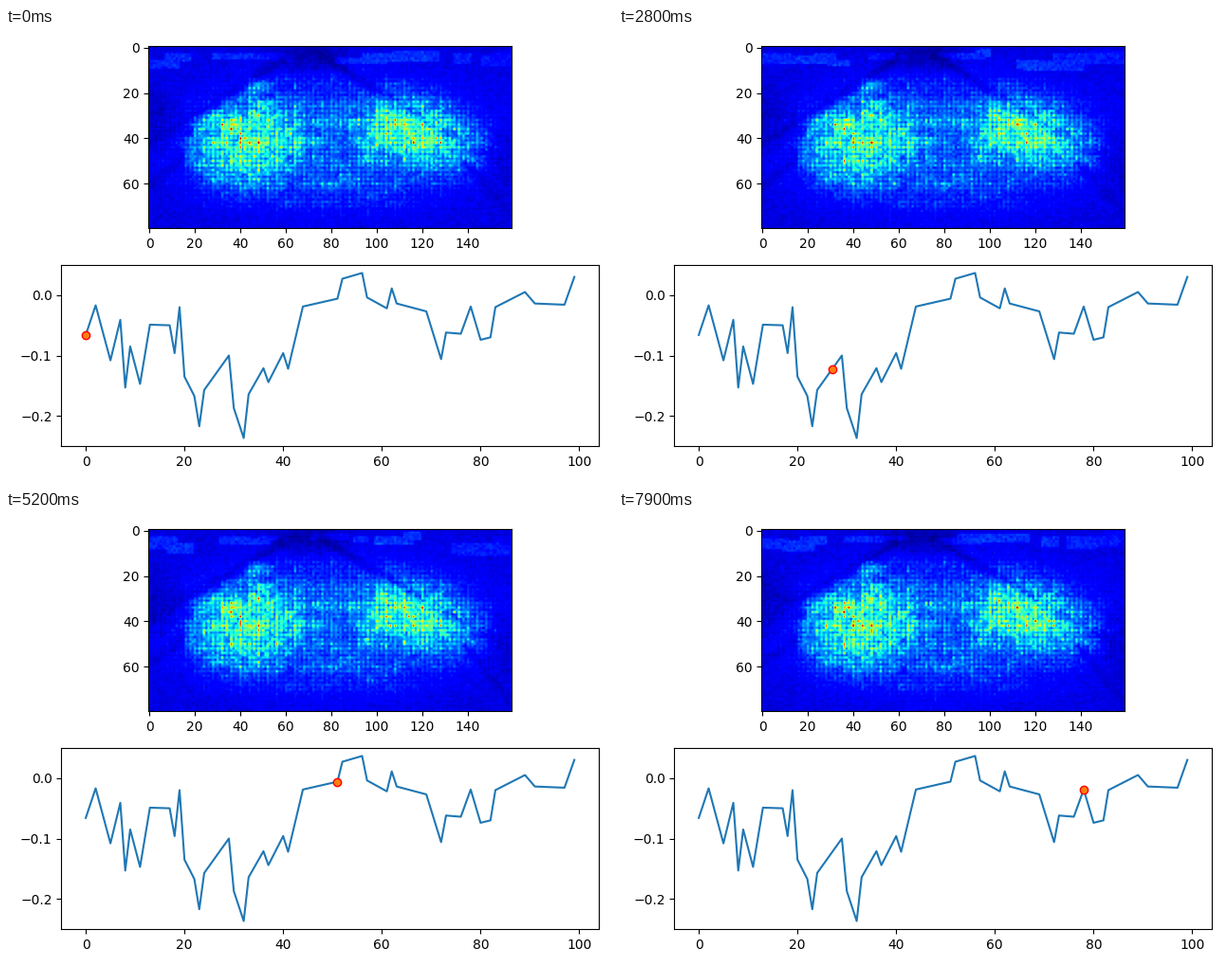
Animation of 640x480 px, one loop 8000 ms. Source, as a matplotlib script:

```python
import numpy as np
import matplotlib.pyplot as plt
from matplotlib.animation import FuncAnimation

COLS, ROWS = 160, 80
FRAMES, STEP_MS = 80, 100
VANISH_X, VANISH_Y = 68, 2

# Turning points of the curve: step, height in thousandths
TURNS = [
    (0, -66), (2, -17), (5, -108), (7, -41), (8, -153), (9, -85),
    (11, -147), (13, -49), (17, -50), (18, -96), (19, -20), (20, -135),
    (22, -167), (23, -217), (24, -157), (29, -100), (30, -187),
    (32, -236.5), (33, -164), (36, -121), (37, -144), (40, -96),
    (41, -122), (44, -19), (51, -6), (52, 27), (56, 36.5), (57, -4),
    (61, -22), (62, 11), (63, -14), (69, -27), (72, -106), (73, -62),
    (76, -64), (78, -19), (80, -74), (82, -70), (83, -20), (89, 5),
    (91, -14), (97, -16), (99, 30)]
steps, heights = np.array(TURNS).T
trace = np.interp(np.arange(100), steps, heights / 1000)

rng = np.random.default_rng(7)
x, y = np.meshgrid(np.arange(COLS), np.arange(ROWS))


def blob(cx, cy, sx, sy, power=3):
    r = np.hypot((x - cx) / sx, (y - cy) / sy)
    return np.exp(-r ** power)


def sigmoid(v):
    return 1 / (1 + np.exp(-v))


def ray(x0, y0, x1, y1, reach):
    """Soft line from one point towards another, fading with distance."""
    size = np.hypot(x1 - x0, y1 - y0)
    dx, dy = (x1 - x0) / size, (y1 - y0) / size
    off = (x - x0) * dy - (y - y0) * dx
    along = (x - x0) * dx + (y - y0) * dy
    return np.exp(-(off / 2) ** 2 - np.abs(along) / reach) * (along > 0)


# Fixed lattice texture
lattice = (1 + 0.2 * np.cos(np.pi * x)) * (1 + 0.15 * np.cos(np.pi * y))
lattice *= 1 + 0.1 * np.cos(np.pi * x / 2)
lattice *= 1 + 0.1 * np.cos(2 * np.pi * (y - 33) / 9)
coarse = np.kron(rng.normal(0, 0.15, (ROWS // 4, COLS // 4)), np.ones((4, 4)))
lattice *= np.exp(rng.normal(0, 0.22, (ROWS, COLS)) + coarse)

# Two centres of attention in a wide, faint glow
left_blob = blob(40, 41, 25, 20) * sigmoid((x - 17) / 1.2)
left_blob *= sigmoid((y - 33 + 0.55 * (x - 15)) / 2)
left_blob += 0.6 * blob(47, 17, 6, 3)
right_blob = blob(113, 35, 19, 15) + 0.6 * blob(132, 42, 18, 13)
right_blob *= sigmoid((150 - x) / 1.2)
right_blob *= 0.7 + 0.3 * sigmoid((y - 20 - 0.42 * (x - 97)) / 2.5)
glow = blob(80, 42, 66, 28)

ground = 0.085 - 0.04 * blob(0, 33, 17, 14) - 0.05 * blob(70, 4, 17, 6)
ground -= 0.03 * blob(160, 50, 14, 14)

# Roadside shapes: side, phase and size are drawn once
COUNT, LIFE = 16, 20
sides = np.where(np.arange(COUNT) % 5 < 2, -1, 1)
phases = rng.permutation(COUNT) * LIFE / COUNT
lengths = rng.uniform(6, 22, COUNT)
levels = rng.uniform(1, 9, COUNT)


def scenery(i):
    """Light shapes that stream away from the vanishing point."""
    light = np.zeros((ROWS, COLS))
    for side, phase, length, level in zip(sides, phases, lengths, levels):
        age = (i + phase) % LIFE / LIFE
        cx = VANISH_X + side * (8 + 92 * age ** 1.4)
        cy = VANISH_Y + level * (0.3 + 0.7 * age)
        half_w = length * (0.4 + 0.4 * age)
        half_h = 1 + 2 * age
        box = (np.abs(x - cx) < half_w) & (np.abs(y - cy) < half_h)
        light = np.maximum(light, box * np.sin(np.pi * age) ** 0.5)
    return light


def heat(i):
    noise = np.random.default_rng(100 + i)
    sway = 3 * np.sin(i * 0.7)
    grain = lattice * np.exp(noise.normal(0, 0.11, (ROWS, COLS)))

    a = 1 + 0.06 * np.sin(i * 1.3)
    b = 1 + 0.06 * np.cos(i * 0.9)
    field = 0.14 * glow + 0.225 * a * left_blob + 0.205 * b * right_blob
    val = ground + field * grain
    val += 0.08 * scenery(i) * noise.uniform(0.7, 1.3, (ROWS, COLS))

    dark = 0.5 * ray(60, 5, 0, 42 + sway, 90)
    dark += 0.3 * ray(16, 48, 0, 61 + sway, 60)
    dark += 0.6 * ray(74, 3, 160, 56 + sway, 50)
    dark += 0.3 * ray(138, 50, 160, 74 - sway, 60)
    val *= 1 - dark
    val += noise.normal(0, 0.012, (ROWS, COLS))
    return np.clip(val, 0, 1)


fig, (top_ax, low_ax) = plt.subplots(2, 1, figsize=(6.4, 4.8), dpi=100)
image = top_ax.imshow(heat(0), cmap="jet", vmin=0, vmax=1)
low_ax.plot(trace)
dot, = low_ax.plot([0], [trace[0]], "o", color="tab:orange",
                   markeredgecolor="red")
fig.tight_layout()


def update(frame):
    i = max(0, frame - 1)
    image.set_data(heat(i))
    dot.set_data([i], [trace[i]])
    return image, dot


anim = FuncAnimation(fig, update, frames=FRAMES, interval=STEP_MS,
                     repeat=True, repeat_delay=0)
plt.show()
```
